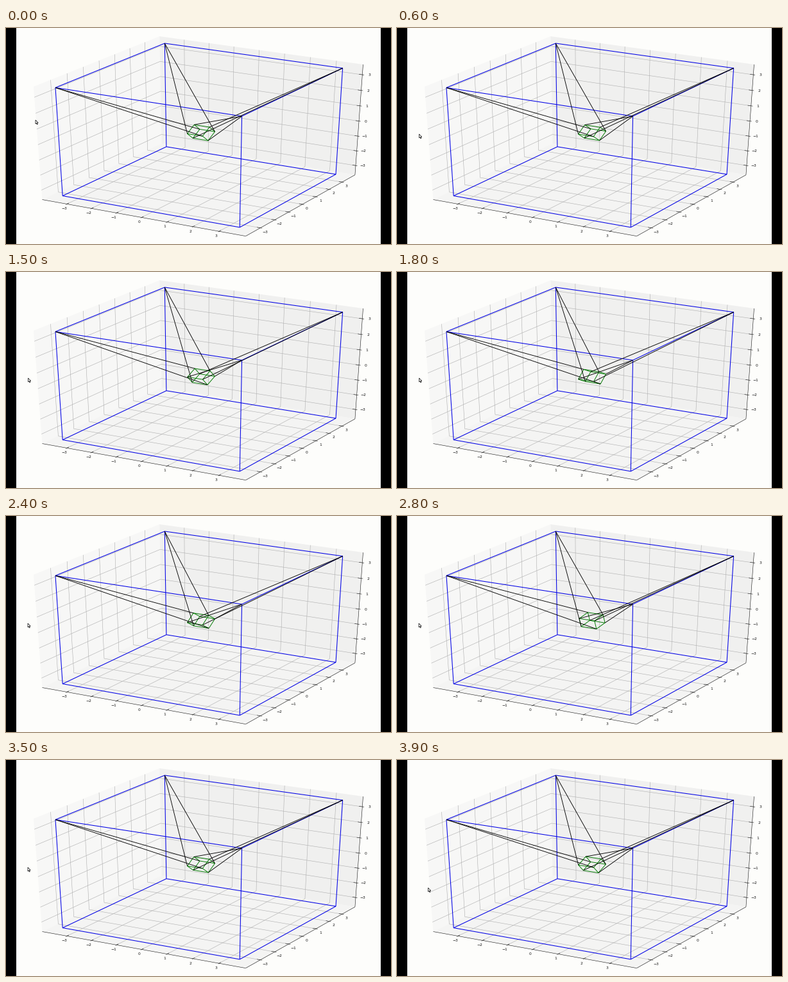
A matplotlib script for the animation above (4 s loop, 600x338 px).

```python
import itertools

import numpy as np
import matplotlib.pyplot as plt
from matplotlib.animation import FuncAnimation
from matplotlib.patches import Polygon, Rectangle

W, H, DPI = 600, 338, 100
FRAMES, INTERVAL = 40, 100
PX = 72 / DPI                            # one pixel in points

ROOM = 3.5                               # half size of the blue frame
SPAN = np.array([7.7, 7.7, 7.0])         # axis ranges
PANE = 0.5 + 1 / 48                      # wall distance in normalised units
HALF = 0.3                               # half size of the platform
ELEV, AZIM, DIST = np.radians(30), np.radians(-60), 10
CENTER = np.array([304.1, 163.8])
ZOOM = np.array([3514, -1935])

RIGHT = np.array([-np.sin(AZIM), np.cos(AZIM), 0])
TOWARD = np.array([np.cos(AZIM) * np.cos(ELEV),
                   np.sin(AZIM) * np.cos(ELEV), np.sin(ELEV)])
UP = np.cross(TOWARD, RIGHT)


def project_unit(p):
    """Perspective view of normalised points, in stage pixels."""
    p = np.asarray(p, float)
    depth = DIST - p @ TOWARD
    return CENTER + ZOOM * np.stack([p @ RIGHT, p @ UP], -1) / depth[..., None]


def project(p):
    return project_unit(np.asarray(p, float) / SPAN)


fig = plt.figure(figsize=(W / DPI, H / DPI), dpi=DPI, facecolor="#fdfdfb")
ax = fig.add_axes([0, 0, 1, 1])
ax.set_xlim(0, W)
ax.set_ylim(H, 0)
ax.axis("off")


def stroke(points, color, width, z):
    line, = ax.plot(*np.transpose(points), color=color, lw=width * PX,
                    zorder=z, solid_capstyle="butt")
    return line


def unit_line(a, b, color, width, z):
    stroke(project_unit([a, b]), color, width, z)


# Walls and floor
for axis, side, color in ((0, -PANE, "#f7f7f6"), (1, PANE, "#f0f0ef"),
                          (2, -PANE, "#f4f4f3")):
    square = [(-PANE, -PANE), (PANE, -PANE), (PANE, PANE), (-PANE, PANE)]
    quad = np.insert(np.array(square), axis, side, axis=1)
    ax.add_patch(Polygon(project_unit(quad), fc=color, ec="none", zorder=1))

# Grid, ticks and numbers
BACK = np.array([-PANE, PANE, -PANE])    # corner where the walls meet
EDGES = (np.array([0, -PANE, -PANE]),
         np.array([PANE, 0, -PANE]),
         np.array([PANE, PANE, 0]))
TICK_AXIS = (1, 0, 0)
for axis, edge in enumerate(EDGES):
    ends = np.array([edge, edge])
    ends[:, axis] = -PANE, PANE
    unit_line(*ends, "#1a1a1a", 0.6, 3)
    for value in range(-3, 4):
        at = value / SPAN[axis]
        for other in {0, 1, 2} - {axis}:
            a, b = BACK.copy(), BACK.copy()
            a[axis] = b[axis] = at
            b[other] = -BACK[other]
            unit_line(a, b, "#b0b0b0", 0.6, 2)

        spot = edge.copy()
        spot[axis] = at
        step = np.zeros(3)
        t = TICK_AXIS[axis]
        step[t] = np.sign(edge[t]) / 120
        unit_line(spot - 2 * step, spot + step, "#1a1a1a", 0.6, 3)

        x, y = project_unit(spot + 0.023 * np.sign(edge))
        ax.text(x, y + 1.2, str(value).replace("-", "\u2212"),
                family="DejaVu Sans", size=6 * PX, color="#111111",
                ha="center", va="center", zorder=3)

CUBE = np.array(list(itertools.product((-1, 1), repeat=3)))
CUBE_EDGES = [(i, j) for i, j in itertools.combinations(range(8), 2)
              if np.abs(CUBE[i] - CUBE[j]).sum() == 2]

frame_px = project(CUBE * ROOM)
for i, j in CUBE_EDGES:
    stroke(frame_px[[i, j]], "#0000e6", 1.05, 4)

# Every upper corner holds two opposite platform vertices
CABLES = []
for cx, cy in itertools.product((-1, 1), repeat=2):
    anchor = project(np.array([cx, cy, 1]) * ROOM)
    vertex = np.array([cy, -cx, 1])
    for v in (vertex, -vertex):
        CABLES.append((anchor, int(np.where((CUBE == v).all(1))[0][0])))

body = [stroke([(0, 0), (0, 0)], "#007a00", 0.95, 5) for _ in CUBE_EDGES]
ropes = [stroke([(0, 0), (0, 0)], "black", 0.9, 6) for _ in CABLES]

for left, width in ((0, 15.5), (584, 16)):
    ax.add_patch(Rectangle((left, 0), width, H, fc="black", ec="none", zorder=8))

ARROW = np.array([(0, 0), (0, 6), (1.4, 4.8), (2.4, 7), (3.3, 6.6),
                  (2.4, 4.4), (4.2, 4.4)])
pointer = Polygon(ARROW, closed=True, fc="white", ec="black", lw=0.7 * PX,
                  zorder=9)
ax.add_patch(pointer)

# Pointer path: time in seconds, x, y
PATH = np.array([(0, 46, 144), (0.3, 62, 302), (0.6, 34.5, 166),
                 (2.0, 34.5, 166), (2.1, 34, 168), (3.6, 34, 168),
                 (3.7, 36, 173), (3.8, 41, 185), (3.9, 48.5, 200)])


def tilt(t):
    """Swing of one radian about the x axis."""
    return np.sin(1.77 * t - 2.04)


def draw(n):
    t = n * INTERVAL / 1000
    c, s = np.cos(tilt(t)), np.sin(tilt(t))
    turn = np.array([[1, 0, 0], [0, c, -s], [0, s, c]])
    pts = project(CUBE * HALF @ turn.T)
    for line, (i, j) in zip(body, CUBE_EDGES):
        line.set_data(*pts[[i, j]].T)
    for line, (anchor, k) in zip(ropes, CABLES):
        line.set_data(*np.transpose([anchor, pts[k]]))
    tip = [np.interp(t, PATH[:, 0], PATH[:, k]) for k in (1, 2)]
    pointer.set_xy(ARROW + tip)
    return body + ropes + [pointer]


anim = FuncAnimation(fig, draw, frames=FRAMES, interval=INTERVAL,
                     repeat=True, repeat_delay=0, blit=False)
plt.show()
```
